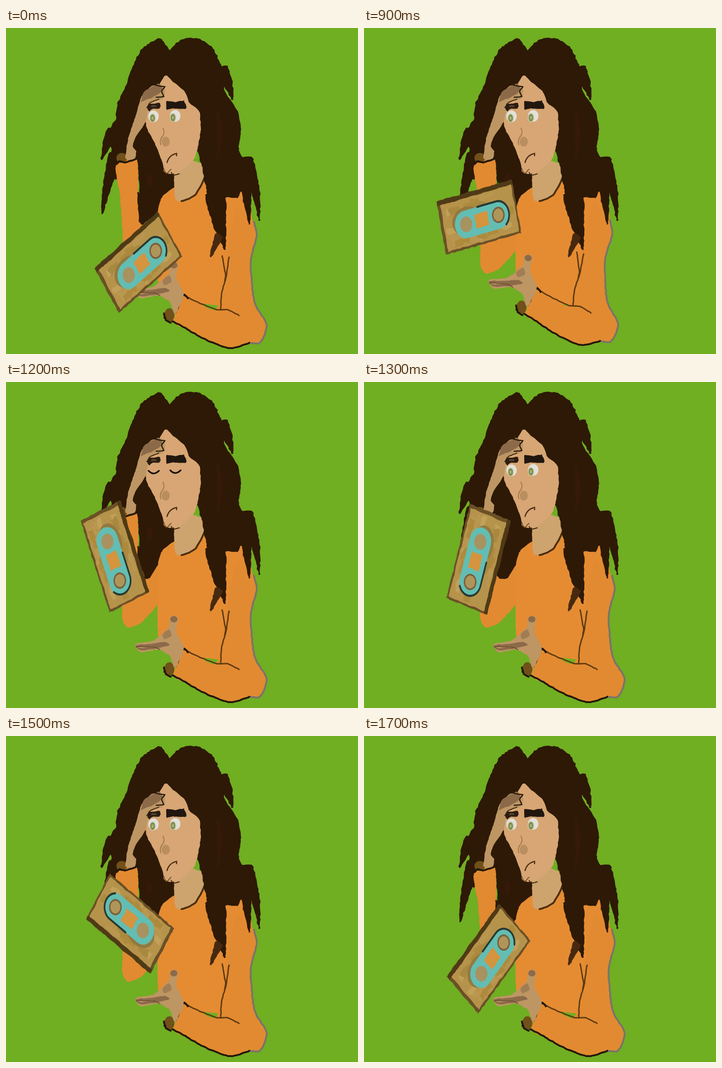
An HTML page for the animation above (1.8 s loop, 778 px wide and 720 px high).

```html
<!DOCTYPE html>
<html lang="en">
<head>
<meta charset="utf-8">
<title>Cassette toss</title>
<style>
html, body { margin: 0; width: 100%; height: 100%; overflow: hidden; background: #70ae22; }
svg { display: block; width: 100%; height: 100%; }
</style>
</head>
<body>
<svg viewBox="0 0 778 720">
  <rect width="778" height="720" fill="#70ae22"/>
  <g id="back"></g>
  <g id="arm"></g>
  <g id="front"></g>
  <g id="open"></g>
  <g id="closed"></g>
  <g id="tape"></g>
</svg>
<script>
const $ = id => document.getElementById(id);
const { sin, hypot, floor, max, round, PI } = Math;

const STRETCH = 1.28;
const HAIR = '#2d1906', TINT = '#36190a', ORANGE = '#e58c33', SLEEVE = '#e28a31';
const SKIN = '#d7a674', TAN = '#bd9664', SHADE = '#8c6a49', CUFF = '#71501a';
const INK = '#24170a', FOLD = '#5c3a10';

let seed = 7;
function rnd() {
  seed = (seed * 16807) % 2147483647;
  return seed / 2147483647 - 0.5;
}

const parse = text => text.trim().split(/\s+/).map(p => p.split(',').map(Number));

// Ragged curve through key points; bend 0 keeps the edges straight.
function trace(pts, closed, amp, bend) {
  const n = pts.length;
  const at = i => closed ? pts[(i + n) % n] : pts[max(0, Math.min(n - 1, i))];
  const out = [];
  for (let i = 0; i < (closed ? n : n - 1); i++) {
    const [o, a, b, c] = [at(i - 1), at(i), at(i + 1), at(i + 2)];
    const steps = max(1, round(hypot(b[0] - a[0], b[1] - a[1]) / 5));
    for (let k = 0; k < steps; k++) {
      const t = k / steps, s = 1 - t;
      out.push([0, 1].map(d => (
        a[d] * s * s * (1 + 2 * t) + b[d] * t * t * (3 - 2 * t) +
        bend * (t * s * s * (b[d] - o[d]) - t * t * s * (c[d] - a[d])) +
        rnd() * amp * (k ? 1 : 0.3)).toFixed(1)).join(' '));
    }
  }
  if (!closed) out.push(at(n - 1).join(' '));
  return 'M' + out.join('L') + (closed ? 'Z' : '');
}

function add(parent, tag, attrs) {
  const el = document.createElementNS('http://www.w3.org/2000/svg', tag);
  for (const k in attrs) el.setAttribute(k, attrs[k]);
  $(parent).appendChild(el);
}
const shape = (parent, fill, text, amp = 1.6, bend = 0.3) =>
  add(parent, 'path', { d: trace(parse(text), true, amp, bend), fill });
const stroke = (parent, color, width, d) =>
  add(parent, 'path', { d, fill: 'none', stroke: color, 'stroke-width': width, 'stroke-linecap': 'round' });
const line = (parent, color, width, text) =>
  stroke(parent, color, width, trace(parse(text), false, 1.5, 0.4));
const oval = (parent, fill, cx, cy, rx, ry, extra) =>
  add(parent, 'ellipse', { cx, cy, rx, ry, fill, ...extra });
const box = (parent, fill, x, y, w, h, amp = 2) =>
  shape(parent, fill, `${x},${y} ${x + w},${y} ${x + w},${y + h} ${x},${y + h}`, amp, 0);

// Tapering strand from a root to a tip.
function lock(parent, fill, x, y, u, v, w, bow = 0) {
  const len = hypot(u - x, v - y), nx = (y - v) / len, ny = (u - x) / len;
  const side = (t, off) => [x + (u - x) * t + nx * off, y + (v - y) * t + ny * off];
  const pts = [side(0, w), side(0.55, w * 0.65 + bow), side(1, 1.5), side(1, -1.5),
    side(0.55, bow - w * 0.65), side(0, -w)];
  add(parent, 'path', { d: trace(pts, true, 2.5, 0.3), fill });
}

function drawBack() {
  shape('back', HAIR, `362,49 340,23 312,36 296,52 278,90 264,128 246,168 241,205 220,238 234,268
    228,310 243,335 290,300 296,432 318,433 342,402 374,350 420,250 400,100`, 3);
  lock('back', HAIR, 238, 225, 211, 291, 13, 2);
  lock('back', HAIR, 241, 280, 212, 411, 14, 2);
  oval('back', TINT, 317, 336, 6, 15);
  shape('back', SLEEVE, `243,301 289,290 292,380 297,432 318,433 336,405 337,485 300,530 270,543
    257,522 258,460 252,370`);
  line('back', HAIR, 4, '292,364 296,428');
  shape('back', ORANGE, `336,402 345,374 372,352 440,336 530,360 543,424 521,520 514,612 400,602
    370,562 337,562 335,480`);
}

function drawArm() {
  const edge = '548,428 554,460 541,515 549,605 576,655 562,694 538,695';
  const under = '538,695 495,707 445,690 405,668 371,649';
  shape('arm', SLEEVE, `${edge} ${under} 391,588 420,603 465,621 488,500 510,395`);
  line('arm', '#79746a', 4, edge);
  line('arm', INK, 4, under + ' 350,640');
  line('arm', FOLD, 3, '390,589 425,606 465,622 490,622 515,635');
  line('arm', INK, 4, '402,597 391,588 384,608 375,628');
  line('arm', FOLD, 3, '478,503 485,550 476,590 475,620');
  line('arm', FOLD, 3, '493,506 488,540 484,560');
  oval('arm', CUFF, 361, 634, 11, 15);
  line('arm', INK, 4, '349,630 353,645 364,651');
  shape('arm', TAN, `285,579 325,572 346,555 361,540 361,524 370,515 381,522 376,553 393,588
    374,632 362,605 336,591 298,597`);
  shape('arm', SHADE, '286,581 325,578 352,574 362,581 336,588 298,593');
  shape('arm', TAN, '290,585 326,583 302,588');
  oval('arm', SHADE, 371, 524, 8, 7);
  shape('arm', '#a27d54', '346,558 361,546 366,560 350,568');
  line('arm', '#6d4e33', 2, '288,585 325,585 340,591');
}

function drawHead() {
  shape('front', '#cda46e', '372,318 375,378 401,381 432,349 439,332 432,300 390,290', 1);
  line('front', '#4a2d0d', 4, '388,382 418,369 438,332');
  shape('front', HAIR, `362,49 388,25 420,22 455,41 470,70 484,105 484,140 511,182 520,225 515,270
    537,305 546,352 518,362 511,376 488,374 460,392 444,365 432,304 400,200 353,105`, 3);
  lock('front', HAIR, 474, 88, 501, 159, 15, -3);
  lock('front', HAIR, 532, 290, 560, 426, 14, -5);
  lock('front', HAIR, 529, 335, 538, 434, 12);
  lock('front', HAIR, 462, 365, 484, 490, 22, 2);
  lock('front', '#48290f', 471, 458, 452, 506, 9);
  lock('front', TINT, 472, 225, 468, 178, 6);
  lock('front', TINT, 472, 225, 466, 290, 6, -3);
  shape('front', SKIN, `353,105 370,120 394,139 406,166 427,184 430,228 418,285 384,318 365,322
    350,318 346,298 332,262 312,222 308,200 316,170 336,130`);
  line('front', '#795128', 2, '349,310 354,321 365,312');
  line('front', '#3d2410', 2, '365,319 372,325 383,322');

  oval('front', CUFF, 256, 287, 12, 11);
  shape('front', TAN, `264,288 271,240 288,190 300,150 325,127 350,129 348,155 319,165 309,207
    286,242 280,262 288,272 284,291`);
  shape('front', SHADE, '298,164 306,140 338,123 345,138 326,152 309,159');
  line('front', INK, 2.5, '331,126 341,129 351,130 344,141 349,151 332,153');
  line('front', '#34230f', 2, '338,157 320,164 311,176');
  line('front', INK, 4, '244,301 251,294 263,297 288,289');

  shape('front', '#2b1d11', '312,176 318,167 340,166 339,178 325,178 317,185', 2.5);
  box('front', '#56402c', 321, 171, 11, 4);
  shape('front', '#21170f', '355,161 375,164 394,160 398,178 370,177 355,181', 2.5, 0.1);
  stroke('front', '#a07748', 2, 'M347 221Q352 231 346 239Q339 247 342 258');
  oval('front', '#ba8e5f', 353, 251, 9, 11);
  stroke('front', '#4b2a12', 2.5, 'M356 297Q360 281 377 277V282');
}

function drawEye(x, y, ix, iy) {
  oval('open', '#e2e1d8', x, y, 11.5, 13);
  oval('open', '#c4c5aa', ix, iy, 7, 10);
  oval('open', '#7b8943', ix, iy, 5, 8);
  oval('open', '#a9b07c', ix, iy, 2.5, 4);
  stroke('closed', '#17110b', 3.5, `M${x - 11} ${y + 1}q11 12 23 0`);
}

// Cassette around 0,0 before the stretch.
function drawTape() {
  box('tape', '#6b5026', -82, -46, 164, 91);
  box('tape', '#4f3a16', -82, -46, 164, 8);
  box('tape', '#b6934b', -76, -38, 154, 79);
  const tones = ['#ad8a3c', '#c1a05a', '#b99750', '#a98840'];
  for (let i = 0; i < 24; i++) {
    const w = 14 + 24 * (rnd() + 0.5), h = 7 + 10 * (rnd() + 0.5);
    box('tape', tones[i % 4], rnd() * (150 - w) - w / 2, rnd() * (74 - h) + 1 - h / 2, w, h, 5);
  }
  oval('tape', '#93793f', -26, 0, 32, 24);
  add('tape', 'rect', { x: -53, y: -18, width: 118, height: 46, rx: 23, fill: '#63bdb2' });
  stroke('tape', '#263b34', 3.5, 'M0 -18H42A23 23 0 0 1 54 24');
  oval('tape', '#a89260', -29, 5, 13, 13);
  oval('tape', '#b0955a', 41, 5, 12, 12, { stroke: '#79603a', 'stroke-width': 3 });
  box('tape', '#d5943e', -9, -7, 28, 24, 1.5);
}

drawBack();
drawArm();
drawHead();
drawEye(326, 195, 324, 199);
drawEye(374, 194, 369, 198);
drawTape();

// One full spin in nine steps, hanging near the top of the toss.
function toss(k) {
  const a = PI * k / 9, up = max(0, sin(a)), skew = sin(2 * a);
  return {
    x: 276 - 30 * up - 18 * skew,
    y: 492 - 104 * up ** 0.4 - 9 * skew,
    spin: 40 * k - 47.5 - 46 * up * up
  };
}

const turn = (x, y, a) => `translate(${x} ${y}) scale(1 ${STRETCH}) rotate(${a})`;
const show = (id, on) => $(id).setAttribute('visibility', on ? 'visible' : 'hidden');

function draw(ms) {
  const step = max(0, floor((ms % 1800 - 700) / 100));
  const { x, y, spin } = step ? toss(step - 1) : { x: 293, y: 518, spin: -35 };
  const lift = step ? 6.6 * max(0, 1.5 - step / 2) : 0;
  const blink = step === 5;
  $('tape').setAttribute('transform', turn(x, y, spin) + ' scale(1.04)');
  $('arm').setAttribute('transform',
    turn(584, 335, lift) + ` scale(1 ${1 / STRETCH}) translate(-584 -335)`);
  show('open', !blink);
  show('closed', blink);
}

const start = performance.now();
function tick() {
  draw(performance.now() - start);
  requestAnimationFrame(tick);
}
tick();
</script>
</body>
</html>
```
